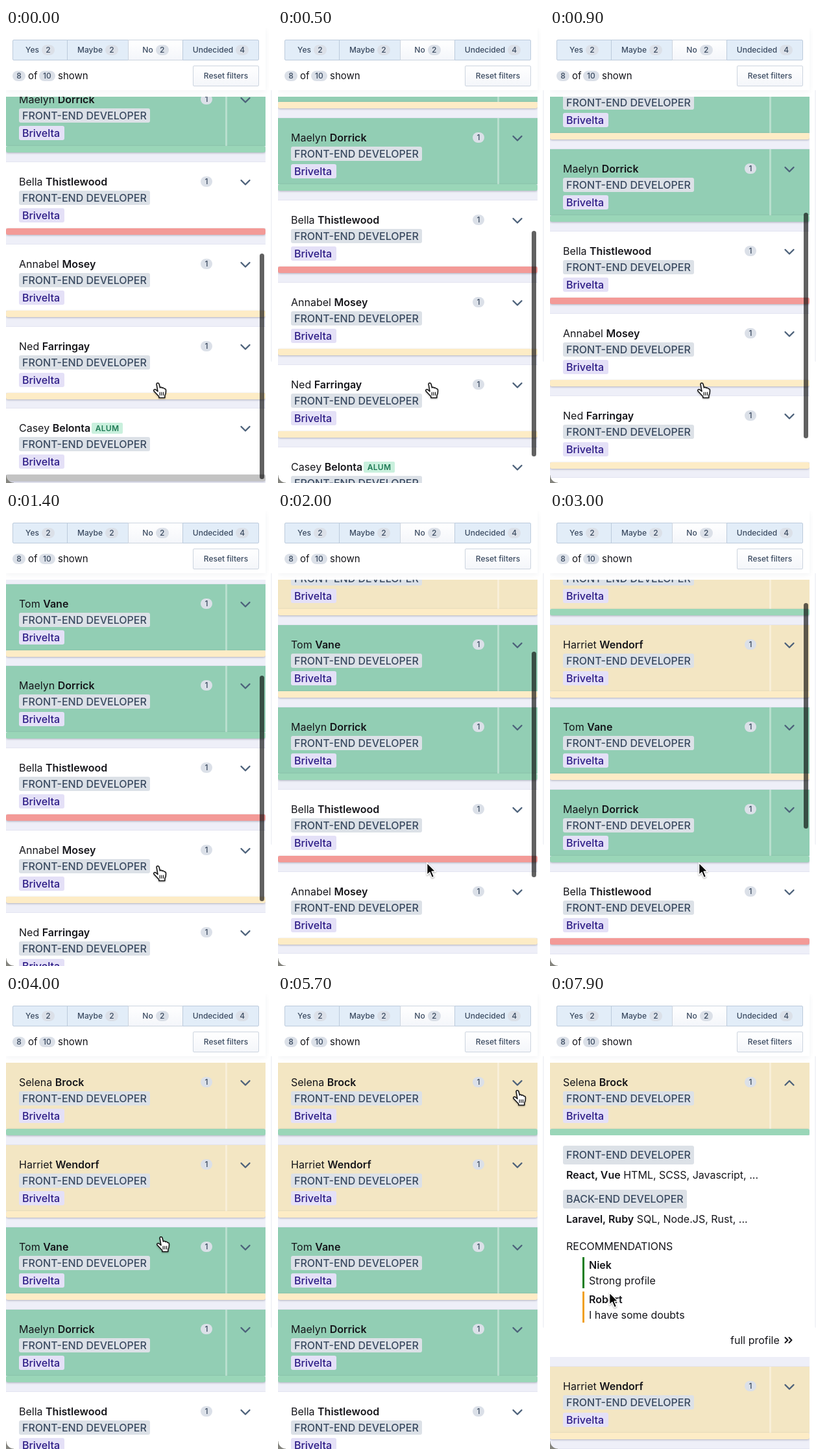
An HTML page that plays this animation: 410 px wide and 702 px high, repeating every 8000 ms.

```html
<!DOCTYPE html>
<html lang="en">
<head>
<meta charset="utf-8">
<style>
html, body { margin: 0; width: 100%; height: 100%; overflow: hidden; background: #fff; }
#stage { position: relative; width: 410px; height: 702px; overflow: hidden; background: #fff;
  font: 400 16px/22px Inter, sans-serif; color: #15151a; }
#stage div, #stage svg { position: absolute; box-sizing: border-box; white-space: pre; }
b { font-weight: 600; }
.head { left: 0; top: 0; width: 400px; height: 96px; background: #fff; box-shadow: 0 2px 8px rgba(40, 50, 90, .06); }
#stage .btn { top: 18px; height: 32px; display: flex; align-items: center; justify-content: center; gap: 4px;
  border: 1px solid #bccbdc; background: #e2edf8; font-size: 12px; font-weight: 500; color: #3a4a60; }
#stage .plain { background: linear-gradient(#fff, #f4f6fa); border-color: #ccd4df; }
.pill { display: inline-block; min-width: 20px; height: 16px; padding: 0 6px; box-sizing: border-box; border-radius: 8px;
  background: #dbe0e8; color: #3a4a60; font: 500 12px/16px Inter, sans-serif; text-align: center; }
.list { left: 0; top: 106px; width: 400px; height: 596px; overflow: hidden; background: #eeeff8; }
.card { left: 0; width: 400px; height: 102px; box-shadow: 0 -1px 0 rgba(90, 90, 140, .07); }
.bar { left: 0; top: 102px; width: 400px; height: 10px; border-radius: 3px; box-shadow: 0 1px 3px rgba(30, 30, 60, .3); }
.split { left: 338px; top: 0; width: 3px; height: 102px; background: rgba(255, 255, 255, .35); }
.tag { left: 20px; padding: 0 5px; border-radius: 3px; background: #dce1e7; color: #3a4a60; font-weight: 500; }
#stage .firm { width: 70px; background: #e4e0f7; color: #2b1a85; }
#stage .alum { left: 132px; top: 22px; width: 48px; height: 17px; border-radius: 2px; background: #c9f0dd;
  color: #1f7a55; font: 600 12px/17px Inter, sans-serif; text-align: center; letter-spacing: .3px; }
.panel { left: 0; top: 112px; width: 400px; background: #fff; overflow: hidden; }
.rule { left: 50px; width: 3px; height: 48px; }
.thumb { left: 391px; width: 7px; height: 348px; border-radius: 4px; background: rgba(0, 0, 0, .62); }
.edge { left: 408px; top: 96px; width: 2px; height: 419px; background: #f3f4f8; border-radius: 0 0 0 2px; }
.corner { left: 0; top: 690px; width: 12px; height: 12px;
  background: radial-gradient(circle at 100% 0, transparent 11px, #85857f 12px); }
svg { overflow: visible; fill: none; stroke-linecap: round; stroke-linejoin: round; }
.chev { left: 361px; top: 27px; stroke: #4b6079; stroke-width: 2.3; }
.cursor { left: 0; top: 0; filter: drop-shadow(0 1px 1px rgba(0, 0, 0, .35)); }
</style>
</head>
<body>
<div id="stage"></div>
<script>
const stage = document.getElementById('stage');

function add(parent, cls, html = '', style = {}) {
  const el = document.createElement('div');
  el.className = cls;
  el.innerHTML = html;
  for (const k in style) el.style[k] = typeof style[k] === 'number' ? style[k] + 'px' : style[k];
  parent.append(el);
  return el;
}
// One line of text, vertically centred on y
const line = (parent, x, y, html, style) => add(parent, '', html, { left: x, top: y - 11, ...style });
const tag = (parent, y, h, text, cls = '') =>
  add(parent, 'tag ' + cls, text, { top: y - h / 2, height: h, lineHeight: h + 'px' });
const pill = n => `<span class="pill">${n}</span>`;

// Cards
const list = add(stage, 'list');
const YELLOW = '#f3e6c3', GREEN = '#92ceb4', WHITE = '#fff', CREAM = '#fdecc6', MINT = '#9ad6b8';
const people = [
  ['Selena', 'Brock', YELLOW, MINT],
  ['Harriet', 'Wendorf', YELLOW, CREAM],
  ['Tom', 'Vane', GREEN, CREAM],
  ['Maelyn', 'Dorrick', GREEN, MINT],
  ['Bella', 'Thistlewood', WHITE, '#f39a97'],
  ['Annabel', 'Mosey', WHITE, CREAM],
  ['Ned', 'Farringay', WHITE, CREAM],
  ['Casey', 'Belonta', WHITE, '#c3c3c3'],
];
const cards = people.map(([first, last, body, bar], i) => {
  const card = add(list, 'card', '', { background: body });
  add(card, 'bar', '', { background: bar });
  if (body !== WHITE) add(card, 'split');
  line(card, 20, 30, `${first} <b>${last}</b>`);
  tag(card, 55, 22, 'FRONT-END DEVELOPER');
  tag(card, 82, 22, 'Brivelta', 'firm');
  if (i < 7) line(card, 300, 30, '<span class="pill" style="min-width:18px;display:block;margin-top:3px">1</span>');
  else add(card, 'alum', 'ALUM');
  card.insertAdjacentHTML('beforeend', '<svg class="chev" width="16" height="9"><path/></svg>');
  return card;
});
const chevrons = cards.map(c => c.querySelector('.chev path'));
const DOWN = 'M1.5 1L8 7.5L14.5 1', UP = 'M1.5 7.5L8 1L14.5 7.5';
chevrons.forEach(c => c.setAttribute('d', DOWN));

// Details that unfold below the first card
const panel = add(cards[0], 'panel');
tag(panel, 30, 29, 'FRONT-END DEVELOPER');
line(panel, 25, 61, '<b>React, Vue</b> HTML, SCSS, Javascript, ...');
tag(panel, 98, 29, 'BACK-END DEVELOPER');
line(panel, 25, 129, '<b>Laravel, Ruby</b> SQL, Node.JS, Rust, ...');
line(panel, 25, 171, 'RECOMMENDATIONS', { fontWeight: 500 });
[['Niek', 'Strong profile', '#0b7d14'], ['Robert', 'I have some doubts', '#f0a020']].forEach(([who, note, color], i) => {
  const y = 188 + 53 * i;
  add(panel, 'rule', '', { top: y, background: color });
  line(panel, 60, y + 12, `<b>${who}</b>`);
  line(panel, 60, y + 36, note);
});
line(panel, 278, 316, 'full profile');
panel.insertAdjacentHTML('beforeend',
  '<svg style="left:361px;top:311px" width="13" height="10" stroke="#15151a" stroke-width="2"><path d="M1.5 1L5.5 5L1.5 9M7.5 1L11.5 5L7.5 9"/></svg>');

// Header
const head = add(stage, 'head');
[['Yes', 2, 10, 94], ['Maybe', 2, 94, 188], ['No', 2, 188, 272], ['Undecided', 4, 272, 390]].forEach(([name, n, a, b]) =>
  add(head, name === 'No' ? 'btn plain' : 'btn', `<span>${name}</span>${pill(n)}`,
    { left: a, width: b - a + (b < 390 ? 1 : 0), borderRadius: a === 10 ? '2px 0 0 2px' : b === 390 ? '0 2px 2px 0' : '0' }));
add(head, 'btn plain', 'Reset filters', { left: 288, top: 58, width: 102, borderRadius: 2 });
line(head, 10, 74, pill(8), { display: 'flex', alignItems: 'center', height: 22 });
line(head, 34, 74, 'of', { fontSize: 15 });
line(head, 51, 74, pill(10), { display: 'flex', alignItems: 'center', height: 22 });
line(head, 80, 74, 'shown', { fontSize: 15 });

const thumb = add(stage, 'thumb');
add(stage, 'edge');
add(stage, 'corner');

// Cursors
stage.insertAdjacentHTML('beforeend', `<svg class="cursor" width="30" height="34">
  <g id="hand" fill="#fff" stroke="#111" stroke-width="1.5">
    <path d="M3.2 8C2.6 5.4 6.2 4.8 6.9 7.2L8.4 13C9.2 11.8 11.2 12 11.6 13.6C12.6 12.6 14.3 13 14.7 14.6C16 14 17.4 15 17.4 16.6C17.6 20 17.2 23 15.8 25.2V28.4H6.8V26.4C4.6 24 1.4 20.8-.8 18.4C-2 16.6-.2 14.8 1.8 16L5 18.8Z"/>
    <path d="M8.2 20V24.6M10.9 20V24.6M13.6 20V24.6" stroke-width="1.2"/>
  </g>
  <path id="arrow" fill="#0a0a0a" stroke="#fff" stroke-width="1.4" d="M.6.8V19.4L4.9 15.4L8.2 23.6L11.6 22.2L8.2 14.2H14Z"/>
</svg>`);
const cursor = stage.querySelector('.cursor');
const hand = document.getElementById('hand'), arrow = document.getElementById('arrow');

// Motion
const linear = u => u;
const smooth = u => u * u * (3 - 2 * u);
function track(keys, t, ease) {
  let i = 0;
  while (i < keys.length - 2 && t >= keys[i + 1][0]) i++;
  const [a, b] = [keys[i], keys[i + 1]];
  const u = ease(Math.min(1, Math.max(0, (t - a[0]) / (b[0] - a[0]))));
  return a.slice(1).map((v, k) => v + (b[k + 1] - v) * u);
}
const scrollKeys = [[0, 406.85], [900, 299.9], [2000, 184], [2600, 114], [3400, 0]];
const cursorKeys = [[0, 229, 542], [3500, 229, 542], [4000, 234, 369], [4500, 234, 369],
  [5400, 364, 143], [6300, 364, 143], [7100, 100, 270], [7900, 91, 460]];

function draw(t) {
  const [scroll] = track(scrollKeys, t, linear);
  const [open] = track([[5900, 0], [6250, 342]], t, smooth);
  cards.forEach((c, i) => c.style.top = Math.round(126.9 * i - scroll + (i ? open : 0)) + 'px');
  panel.style.height = open + 'px';
  chevrons[0].setAttribute('d', open > 0 ? UP : DOWN);

  thumb.style.top = 108 + .59 * scroll + 'px';
  thumb.style.opacity = track([[3700, 1], [3950, 0]], t, linear)[0];

  const [x, y] = track(cursorKeys, t, smooth);
  const pointing = t < 1900 || (t >= 3600 && t < 6600);
  cursor.style.transform = `translate(${x}px, ${y}px)`;
  hand.style.display = pointing ? '' : 'none';
  arrow.style.display = pointing ? 'none' : '';
}

const start = performance.now();
function frame() {
  const t = (performance.now() - start) % 8000;
  draw(Math.floor(t / 100) * 100);
  requestAnimationFrame(frame);
}
frame();
</script>
</body>
</html>
```
